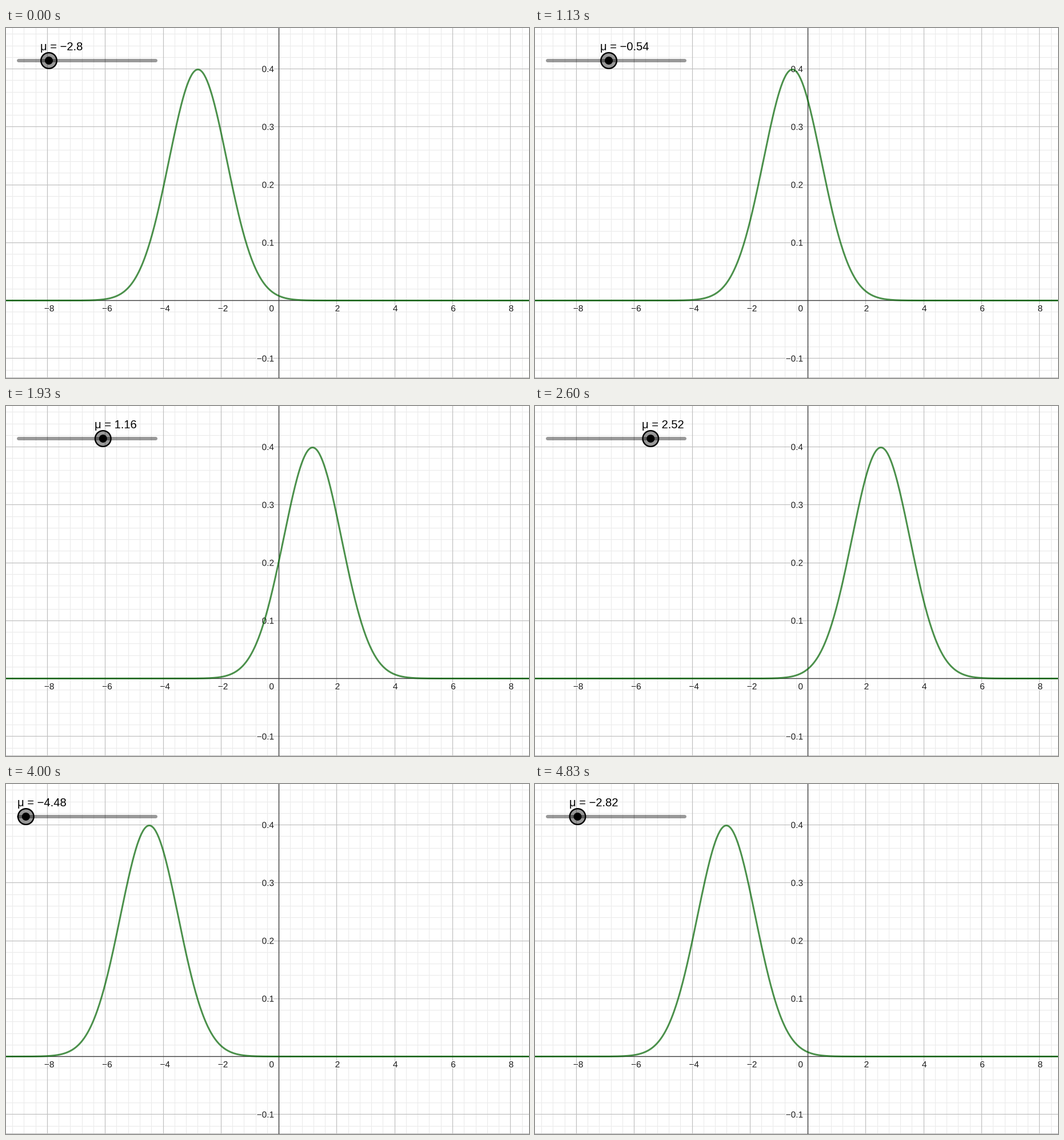
These frames come from a looping animation (915 by 612 pixels, 4920 ms). A matplotlib script:

```python
import numpy as np
import matplotlib.pyplot as plt
from matplotlib.animation import FuncAnimation
from matplotlib.collections import LineCollection
from matplotlib.patches import Circle
from matplotlib.patheffects import withStroke

W, H, DPI = 915, 612, 100
LOOP, TICK = 4920, 20
X0, Y0 = 477.6, 476.5            # pixel position of the plot's origin
UNIT_X, UNIT_Y = 50.65, 1012.5   # pixels per unit
SLIDER_Y, SLIDER_MID, SLIDER_UNIT = 57, 142, 23.93
MINUS = "\u2212"

# Step number against the mean, counted on past the slider's end at 5
STEPS = [0, 17, 29, 39, 51, 57, 58, 60, 72]
MEANS = [-2.8, -0.54, 1.16, 2.52, 4.18, 5.0, 5.22, 5.52, 7.18]

plt.rcParams["font.family"] = "Liberation Sans"


def pt(px):
    return px * 72 / DPI


def px_x(x):
    return X0 + UNIT_X * x


def px_y(y):
    return Y0 - UNIT_Y * y


def crisp(v):
    return np.floor(v) + 0.5


def number(v):
    return f"{v:g}".replace("-", MINUS)


def mean_at(ms):
    """Mean of the curve; it advances at 15 steps a second, the last one late."""
    step = int((ms + 3.4) * 15 / 1000)
    step = min(step, 72 if ms >= 4830 else 71)
    mu = round(np.interp(step, STEPS, MEANS) / 0.02) * 0.02
    return round(mu - 10 if mu > 5.001 else mu, 2)


def add_lines(ax, xs, ys, color, width, z):
    segs = [[(crisp(x), 0), (crisp(x), H)] for x in xs]
    segs += [[(0, crisp(y)), (W, crisp(y))] for y in ys]
    lines = LineCollection(segs, colors=color, linewidths=pt(width), zorder=z)
    lines.set_snap(False)
    ax.add_collection(lines)


def add_label(ax, x, y, text, ha):
    ax.text(x, y, text, ha=ha, va="baseline", fontsize=pt(15.4), color="#1c1c1c",
            zorder=4, path_effects=[withStroke(linewidth=pt(3), foreground="white")])


fig = plt.figure(figsize=(W / DPI, H / DPI), dpi=DPI, facecolor="white")
ax = fig.add_axes([0, 0, 1, 1])
ax.set_xlim(0, W)
ax.set_ylim(H, 0)
ax.axis("off")

# Grid and axes
minor_x = [px_x(0.4 * i) for i in range(-23, 22) if i % 5]
minor_y = [px_y(0.02 * i) for i in range(-6, 24) if i % 5]
major_x = [px_x(2 * i) for i in range(-4, 5) if i]
major_y = [px_y(0.1 * i) for i in range(-1, 5) if i]
add_lines(ax, minor_x, minor_y, "#ebebeb", 1.1, 1)
add_lines(ax, major_x, major_y + [H - 1], "#bfbfbf", 1.2, 2)
add_lines(ax, [X0], [Y0], "#3a3a3a", 1.4, 3)

for v in range(-8, 9, 2):
    if v:
        add_label(ax, px_x(v) + (3.2 if v < 0 else 1), 495.5, number(v), "center")
add_label(ax, 469, 495.5, "0", "right")
for v in (-0.1, 0.1, 0.2, 0.3, 0.4):
    add_label(ax, 469, px_y(v) + 5.5, number(v), "right")

# Bell curve
xs = np.linspace(-10, 9, 761)
curve, = ax.plot([], [], color=(0, 0.39, 0, 0.7), lw=pt(3), zorder=5,
                 solid_joinstyle="round")
curve.set_snap(False)

# Slider
ends = [SLIDER_MID - 5 * SLIDER_UNIT, SLIDER_MID + 5 * SLIDER_UNIT]
ax.plot(ends, [SLIDER_Y] * 2, color=(0, 0, 0, 0.4), lw=pt(6),
        solid_capstyle="round", zorder=6)
knob = [
    Circle((0, SLIDER_Y), 13.8, fc=(0, 0, 0, 0.4), ec="none", zorder=7),
    Circle((0, SLIDER_Y), 13.8, fc="none", ec="black", lw=pt(2.4), zorder=8),
    Circle((0, SLIDER_Y), 7, fc="black", ec="none", zorder=8),
]
for part in knob:
    ax.add_patch(part)
caption = ax.text(0, 39, "", fontsize=pt(20.2), color="black", va="baseline", zorder=9)


def draw(i):
    mu = mean_at(i * TICK + TICK / 2)
    density = np.exp(-(xs - mu) ** 2 / 2) / np.sqrt(2 * np.pi)
    curve.set_data(px_x(xs), px_y(density))
    x = SLIDER_MID + SLIDER_UNIT * mu
    for part in knob:
        part.center = (x, SLIDER_Y)
    caption.set_x(x - 15)
    caption.set_text(f"\u03bc = {number(mu)}")
    return [curve, *knob, caption]


anim = FuncAnimation(fig, draw, frames=LOOP // TICK, interval=TICK,
                     repeat=True, repeat_delay=0)
plt.show()
```
